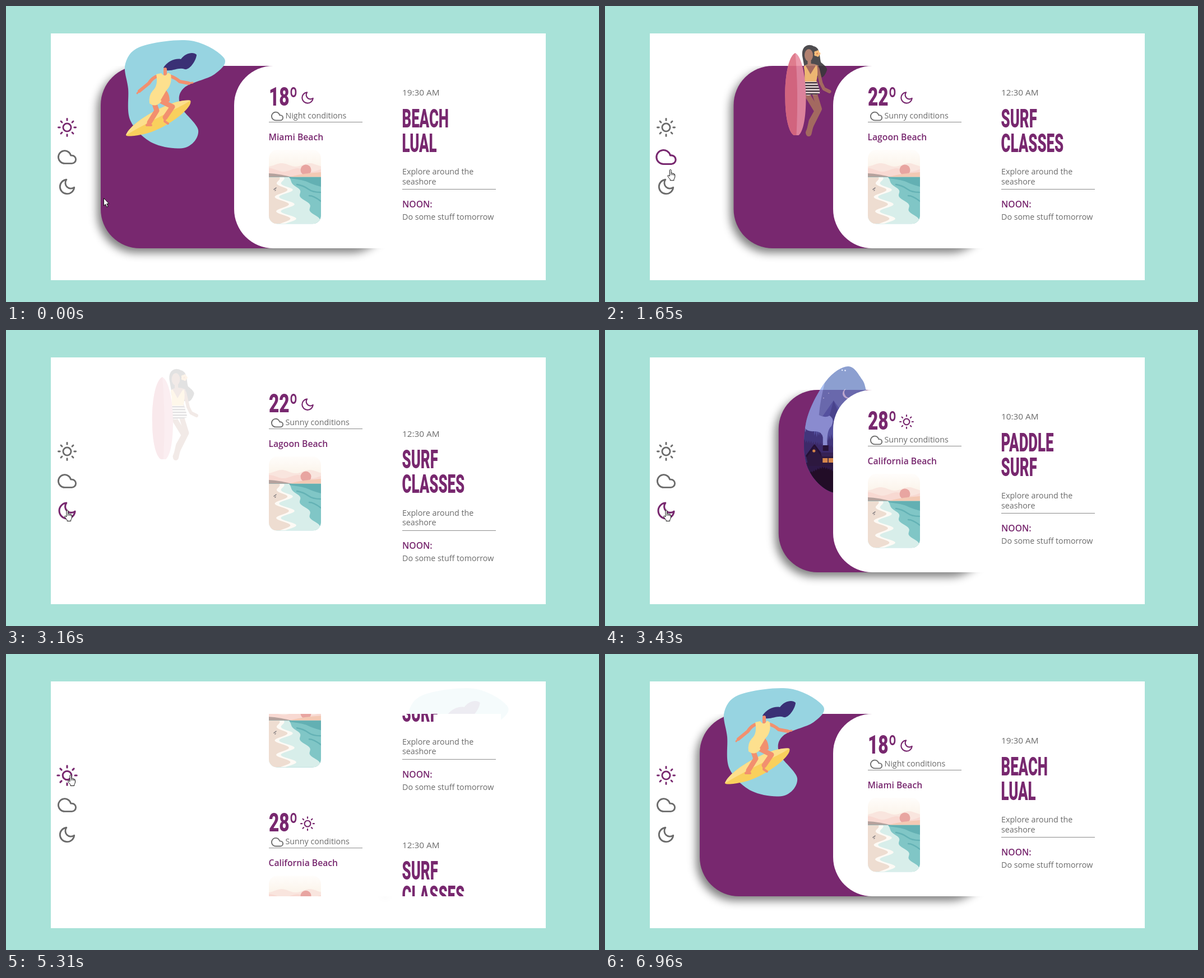
An HTML page that plays this animation: 1058x529 px, repeating every 7.35 s.

```html
<!DOCTYPE html>
<html lang="en">
<head>
<meta charset="utf-8">
<title>Beach day cards</title>
<style>
html, body { margin: 0; width: 100%; height: 100%; overflow: hidden; background: #a8e2d8; }
svg { display: block; }
text { font-family: "Open Sans", "Noto Sans", sans-serif; font-size: 14.25px; fill: #6b6b6b; }
.time { font-size: 15.3px; }
.bold { font-size: 15.7px; font-weight: 600; fill: #78286f; }
.big { font-family: Roboto, "Liberation Sans", sans-serif; font-size: 46.5px; font-weight: 900; fill: #78286f; }
</style>
</head>
<body>
<svg id="stage" width="1058" height="529" viewBox="0 0 1058 529"></svg>
<script>
const LOOP = 7350, STEP = 136, SLIDE = 326, TRAVEL = 553;
const PURPLE = '#78286f', GRAY = '#6b6b6b';

const slides = [
  { temp: '18º', icon: 'moon', sky: 'Night conditions', place: 'Miami Beach', time: '19:30 AM', title: ['BEACH', 'LUAL'] },
  { temp: '22º', icon: 'moon', sky: 'Sunny conditions', place: 'Lagoon Beach', time: '12:30 AM', title: ['SURF', 'CLASSES'] },
  { temp: '28º', icon: 'sun', sky: 'Sunny conditions', place: 'California Beach', time: '10:30 AM', title: ['PADDLE', 'SURF'] }
];

// Each change of slide: when the text starts to scroll and when the card starts to slide in
const moves = [
  { from: 0, to: 1, text: 1292, card: 1318 },
  { from: 1, to: 2, text: 3120, card: 3198 },
  { from: 2, to: 0, text: 5261, card: 5263 }
];

// The pointer rests on each icon in turn, then leaves
const home = { x: 174, y: 343 };
const trips = [
  { start: 140, end: 600, x: 120, y: 276 },
  { start: 1560, end: 2040, x: 109, y: 321 },
  { start: 3620, end: 4300, x: 115, y: 215 },
  { start: 5720, end: 6960, x: 1050, y: 529 }
];

// Bursts of activity, each refreshed in even steps
const bursts = [0, 1350, 3150, 5174];

const clamp = v => Math.max(0, Math.min(1, v));
const easeOut = x => 1 - (1 - clamp(x)) ** 3;
const mix = (a, b, k) => a + (b - a) * k;

// cubic-bezier(.25, .1, .25, 1)
function ease(x) {
  if (x <= 0 || x >= 1) return clamp(x);
  const bez = (u, a, b) => 3 * u * (1 - u) ** 2 * a + 3 * u * u * (1 - u) * b + u ** 3;
  let lo = 0, hi = 1;
  for (let i = 0; i < 24; i++) {
    const mid = (lo + hi) / 2;
    if (bez(mid, .25, .25) < x) lo = mid; else hi = mid;
  }
  return bez(lo, .1, 1);
}

function seeded(seed) {
  return () => (seed = seed * 16807 % 2147483647) / 2147483647;
}

// Closed smooth outline through a few points
function blob(p) {
  const n = p.length, at = i => p[(i + n) % n];
  let d = `M${p[0]}`;
  for (let i = 0; i < n; i++) {
    const [a, b, c, e] = [at(i - 1), at(i), at(i + 1), at(i + 2)];
    const c1 = [0, 1].map(k => b[k] + (c[k] - a[k]) / 6);
    const c2 = [0, 1].map(k => c[k] - (e[k] - b[k]) / 6);
    d += `C${c1} ${c2} ${c}`;
  }
  return d + 'Z';
}

// Area under the curve y = f(x)
function hills(from, to, step, bottom, f) {
  let d = `M${from} ${bottom}`;
  for (let x = from; x <= to; x += step) d += `L${x} ${f(x).toFixed(1)}`;
  return d + `V${bottom}Z`;
}

const shape = (d, fill) => `<path d="${d}" fill="${fill}"/>`;
const limb = (d, color, w) =>
  `<path d="${d}" fill="none" stroke="${color}" stroke-width="${w}" stroke-linecap="round" stroke-linejoin="round"/>`;
const dot = (x, y, r, fill) => `<circle cx="${x}" cy="${y}" r="${r}" fill="${fill}"/>`;
const box = (x, y, w, h, fill) => `<rect x="${x}" y="${y}" width="${w}" height="${h}" fill="${fill}"/>`;
const words = (x, y, s, cls = '') => `<text x="${x}" y="${y}" class="${cls}">${s}</text>`;
const display = (x, y, s, narrow) =>
  `<text class="big" transform="translate(${x} ${y}) scale(${narrow} 1)">${s}</text>`;

let rays = '';
for (let a = 0; a < 360; a += 45) rays += `<path d="M12 1v2" transform="rotate(${a} 12 12)"/>`;
const glyphs = {
  sun: '<circle cx="12" cy="12" r="5"/>' + rays,
  cloud: '<path d="M18 10h-1.26A8 8 0 1 0 9 20h9a5 5 0 0 0 0-10z"/>',
  moon: '<path d="M21 12.8A9 9 0 1 1 11.2 3a7 7 0 0 0 9.8 9.8z"/>'
};
const place = (x, y, size) => `translate(${x} ${y}) scale(${size / 24}) translate(-12 -12)`;
const icon = (name, x, y, size, color, id = '') =>
  `<g id="${id}" transform="${place(x, y, size)}" fill="none" stroke="${color}" stroke-width="2"
    stroke-linecap="round" stroke-linejoin="round">${glyphs[name]}</g>`;
const navY = i => 217 + 53 * i;

// Everything left of a waving shoreline
function shore(x, slope, swing) {
  let d = 'M0 49';
  for (let y = 49; y <= 132; y++) {
    const wave = swing * Math.sin((y - 65) / 4.1) * clamp((y - 49) / 20);
    d += `L${(x + slope * (y - 49) + wave).toFixed(1)} ${y}`;
  }
  return d + 'H0Z';
}

function beach() {
  const ridge = (top, swing, color) => shape(hills(0, 93, 3, 50, x => top + swing * Math.sin(x / 8 + top)), color);
  return `<g transform="translate(469 257)" clip-path="url(#photo)">`
    + box(0, 0, 93, 132, 'url(#dawn)')
    + ridge(27, 3, '#f9e5de') + ridge(36, 3, '#f8d9d2')
    + dot(66, 36, 9.5, '#e8a5a1')
    + shape('M34 49Q60 42 93 40V49Z', '#f3c9b4')
    + shape('M0 42Q20 43 42 49H0Z', '#b5a29d')
    + box(0, 48.5, 93, 84, '#80c6c6')
    + shape('M36 49H93V66Q78 62 70 58T36 51Z', '#63b0b3')
    + limb('M50 62Q62 64 70 70T92 76M72 82Q80 82 93 92', '#64b2b5', 2.5)
    + shape(shore(36, .68, 4), '#d8eeea')
    + shape(shore(27, .12, 13), '#fdfaf5')
    + shape(shore(19, .1, 12), '#eeddd1')
    + limb('M9 71L13 68M11 73L12 72', '#8c8586', 1.6)
    + '</g>';
}

function surfer() {
  const skin = '#f2906f', suit = '#fde08e';
  return shape(blob([[213, 103], [242, 72], [330, 62], [389, 93], [372, 122], [318, 146], [311, 178],
      [343, 222], [320, 253], [262, 245], [222, 205], [218, 148]]), '#97d4e1')
    + shape('M214 231C222 206 300 164 329 169C335 182 284 221 246 229C232 232 216 234 214 231Z', '#f9d05d')
    + shape('M214 231C222 206 300 164 329 169C310 182 250 208 214 231Z', '#fddf8c')
    + shape('M281 110C288 99 302 93 312 95C320 84 334 81 340 87C340 96 328 115 319 113C308 109 298 117 286 115Z', '#3a3075')
    + limb('M284 113V122', skin, 6)
    + limb('M271 125Q261 128 255 138L238 152', skin, 6)
    + limb('M238 152L234 156', skin, 3)
    + limb('M292 125Q302 128 310 135L326 138', skin, 6)
    + limb('M326 138L333 137', skin, 3)
    + limb('M264 172L269 187L256 208', skin, 9)
    + limb('M256 208L251 213H259', skin, 4)
    + limb('M277 170L297 180L284 199', skin, 9)
    + limb('M284 199L283 206L289 210', skin, 4)
    + shape('M268 122L277 120Q284 129 289 119L294 122Q297 140 286 151Q282 164 276 172Q266 182 256 174Q254 160 262 151Q272 142 268 122Z', suit)
    + shape('M286 151Q292 158 292 170L282 176L276 168Z', skin);
}

function girl() {
  const skin = '#a9725f';
  let stripes = '', flower = '';
  for (let y = 136; y < 160; y += 5) stripes += box(290, y, 36, 2.4, '#3c3637');
  for (let a = 0; a < 6; a += 1.26) flower += dot(318 + 3.2 * Math.cos(a), 85 + 3.2 * Math.sin(a), 2.6, '#f8b76c');
  return shape('M292 92C288 72 302 66 312 72C324 74 322 92 325 101C334 108 337 112 335 116C332 124 328 130 322 127C304 128 292 122 295 108Z', '#39373a')
    + limb('M319 112L325 138L330 148L340 153', skin, 6)
    + limb('M301 160L318 188L308 206L303 228', skin, 10)
    + limb('M314 158L322 184L308 212L302 226', skin, 9)
    + shape('M296 106Q306 100 320 106Q322 118 316 130L320 140H296Z', skin)
    + `<ellipse cx="303" cy="88" rx="7.5" ry="11" fill="${skin}"/>` + limb('M304 98V107', skin, 6)
    + shape('M294 108L297 106Q303 116 306 122Q312 112 316 106L318 108Q320 124 316 136H295Q297 122 294 108Z', '#fcc873')
    + `<g clip-path="url(#shorts)">${box(285, 130, 45, 40, '#f6efe7')}${stripes}</g>`
    + flower + dot(318, 85, 1.5, '#df7942')
    + shape('M279 84C266 90 260 130 261 165C261 200 268 228 277 231H285C294 224 298 196 298 165C298 128 291 90 279 84Z', '#e98ea2')
    + shape('M279 84C266 90 260 130 261 165C261 200 268 228 277 231H281Q285 150 279 84Z', '#dc6c80');
}

function night() {
  const random = seeded(77);
  const layer = (f, color) => shape(hills(205, 395, 2, 300, f), color);
  const tooth = (x, size) => (x % 4 < 2 ? size : -size) * (.6 + random() * .6);
  let stars = '';
  for (let i = 0; i < 16; i++) stars += dot(235 + random() * 150, 70 + random() * 75, .7 + random() * .6, '#dfe6ff');
  return `<g clip-path="url(#nightShape)">` + box(205, 60, 190, 240, '#657fc1') + stars
    + shape('M289 105A9 9 0 1 0 297 121A9.5 9.5 0 0 1 289 105Z', '#d3d0ee')
    + shape('M205 215L267 126L308 182L327 158L352 182L392 200V300H205Z', '#4a5fb0')
    + shape('M267 126L276 148L290 160L300 180L322 200L262 205L272 178L258 160Z', '#3a4d97')
    + shape('M327 158L334 174L352 182L344 204L308 200Z', '#3a4d97')
    + layer(x => 202 - Math.abs(x - 290) * .36 + tooth(x, 5) + 3 * Math.sin(x * .3), '#2f3a80')
    + layer(x => 212 - Math.abs(x - 285) * .2 + tooth(x, 3), '#282c68')
    + layer(x => 240 + 3 * Math.sin(x * .05), '#15143a')
    + shape('M282 243Q292 231 302 238Q310 236 314 243Z', '#4a63b4')
    + shape('M248 207L248 192Q246 180 231 181Q212 182 214 162L236 100L253 88Q243 125 241 152Q252 158 260 153Q270 160 263 172Q254 180 256 207Z', '#91aef0')
    + shape('M218 225L233 205L246 221H288L291 243H222Z', '#14132f')
    + limb('M219 225L233 206L246 224', '#0a0920', 3)
    + shape('M244 219H284L290 226H246Z', '#20204c')
    + box(248, 206, 10, 10, '#0d0c26') + dot(232, 216, 2.6, '#f4a23c')
    + box(247.5, 229, 9, 8, '#f6a83f') + box(258, 229, 9, 8, '#f6a83f')
    + layer(x => 250 + 4 * Math.sin(x * .12) + tooth(x, 2), '#05040f') + '</g>';
}

const leftSlide = s => display(469, 178, s.temp, .68)
  + icon(s.icon, 538, 164, 26, PURPLE) + icon('cloud', 484, 197, 22, GRAY)
  + words(498.5, 201, s.sky) + box(469, 207, 167, 1, '#8a8a8a')
  + words(468.5, 240, s.place, 'bold') + beach();

const rightSlide = s => words(707, 160, s.time, 'time')
  + s.title.map((line, i) => display(706.5, 216.5 + 44 * i, line, .555)).join('')
  + words(707, 301, 'Explore around the') + words(707, 318.5, 'seashore')
  + box(707, 327, 167, 1, '#8a8a8a')
  + words(707, 360, 'NOON:', 'bold') + words(707, 382, 'Do some stuff tomorrow');

const nightEdge = blob([[293, 65], [319, 90], [334, 124], [380, 123], [386, 180],
  [340, 263], [270, 291], [221, 246], [218, 165], [253, 92]]);

const stage = document.getElementById('stage');
stage.innerHTML = `<defs>
  <clipPath id="window"><rect x="407" y="107" width="476" height="326"/></clipPath>
  <clipPath id="photo"><rect width="93" height="132.5" rx="15"/></clipPath>
  <clipPath id="shorts"><path d="M295 135H317Q323 148 323 156Q314 160 308 158Q302 162 296 158Z"/></clipPath>
  <clipPath id="nightShape"><path d="${nightEdge}"/></clipPath>
  <linearGradient id="dawn" x2="0" y2="1"><stop stop-color="#fffdfb"/><stop offset=".25" stop-color="#fbf3e9"/></linearGradient>
  <filter id="soft" filterUnits="userSpaceOnUse" x="100" y="107" width="660" height="380"><feGaussianBlur stdDeviation="8"/></filter>
  </defs>`
  + box(0, 0, 1058, 529, '#a8e2d8') + box(80, 49, 883, 441, '#fff')
  + `<rect id="shadow" y="115" height="326" rx="70" ry="70" filter="url(#soft)"/>
  <rect id="card" y="107" height="326" rx="70" ry="70" fill="${PURPLE}"/>`
  + [surfer, girl, night].map((draw, i) => `<g id="art${i}">${draw()}</g>`).join('')
  + `<path d="M883 107H477A70 70 0 0 0 407 177V363A70 70 0 0 0 477 433H883Z" fill="#fff"/>
  <g clip-path="url(#window)">`
  + slides.map((s, i) => `<g id="left${i}">${leftSlide(s)}</g><g id="right${i}">${rightSlide(s)}</g>`).join('')
  + '</g>'
  + ['sun', 'cloud', 'moon'].map((n, i) => icon(n, 109, navY(i), 34, GRAY, 'nav' + i)).join('')
  + `<g id="pointer" fill="#fff" stroke="#111" stroke-linejoin="round">
  <path id="arrow" d="M.5 .5V14L3.5 11.2 5.8 16.3 8 15.3 5.8 10.4H9.8Z"/>
  <g id="hand" transform="translate(-5 0)"><path d="M4 2Q5.3 -.3 6.8 2V7.5Q8.3 6 9.4 8Q10.8 7 11.7 9Q13.3 8.5 13.5 10.5V14Q13 17 11.7 18.3V20.5H5V18.5Q2 15.5 .5 12.2Q1 10.2 4 12.8Z"/>
  <path d="M6.8 7.5V11M9.4 8V11M11.7 9V11.5" fill="none"/></g></g>`;

const el = id => document.getElementById(id);
const set = (id, attrs) => { for (const k in attrs) el(id).setAttribute(k, attrs[k]); };

function pointerAt(t) {
  let { x, y } = home;
  for (const trip of trips) {
    const k = easeOut((t - trip.start) / (trip.end - trip.start));
    x = mix(x, trip.x, k);
    y = mix(y, trip.y, k);
  }
  return { x, y };
}

function snap(time) {
  const start = bursts.filter(b => b <= time).pop();
  return start + Math.floor((time - start) / STEP) * STEP;
}

function render(time) {
  const t = snap(time);
  const move = moves.filter(m => m.text <= t).pop();
  const now = move ? move.to : 0;
  const scroll = move ? mix(move.from, move.to, ease((t - move.text) / 300)) : 0;
  const shown = move ? ease((t - move.card) / 500) : 1;
  const offset = TRAVEL * (1 - shown);
  const width = Math.max(0, 521 - offset);

  set('card', { x: 169 + offset, width });
  set('shadow', { x: 163 + offset, width, opacity: .5 * clamp(width / 200) });

  const { x, y } = pointerAt(t);
  let pointing = false;
  slides.forEach((s, i) => {
    const shift = (i - scroll) * SLIDE;
    set('left' + i, { transform: `translate(0 ${shift})` });
    set('right' + i, { transform: `translate(0 ${-shift})` });

    const leaving = move && i === move.from ? clamp(1 - (t - move.text) / 35) : 0;
    set('art' + i, i === now
      ? { transform: `translate(${offset} 0)`, opacity: shown }
      : { transform: '', opacity: leaving });

    const hover = Math.abs(x - 109) < 20 && Math.abs(y - navY(i)) < 25;
    pointing = pointing || hover;
    set('nav' + i, {
      transform: place(109, navY(i), hover ? 37.4 : 34),
      stroke: i === now ? PURPLE : GRAY
    });
  });

  set('pointer', { transform: `translate(${x} ${y})` });
  set('hand', { opacity: pointing ? 1 : 0 });
  set('arrow', { opacity: pointing ? 0 : 1 });
}

const start = performance.now();
function loop() {
  render((performance.now() - start) % LOOP);
  requestAnimationFrame(loop);
}
loop();
</script>
</body>
</html>
```
